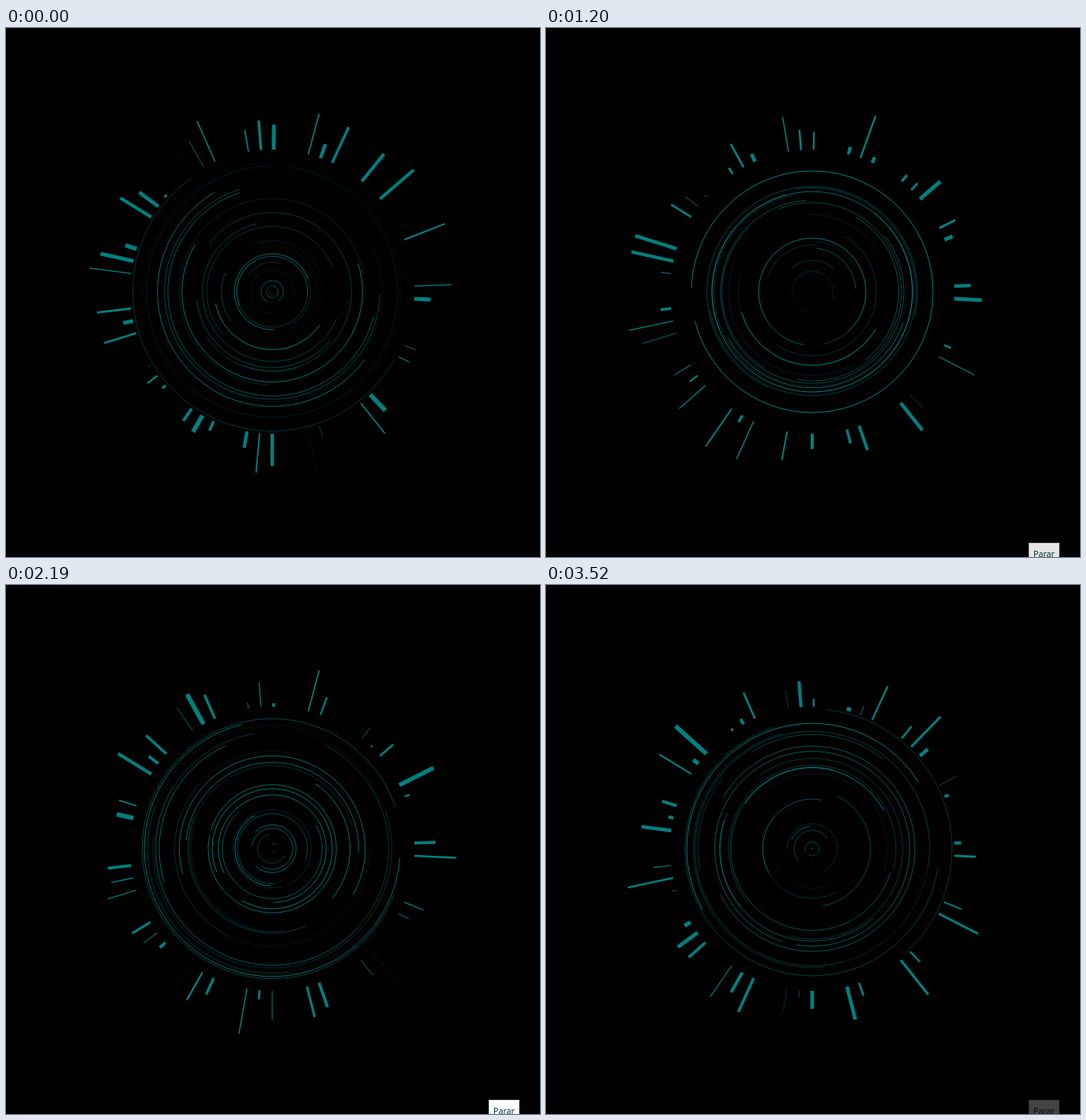
These frames come from a looping animation (676 by 670 pixels, 3590 ms). An HTML page with a canvas:

```html
<!DOCTYPE html>
<html lang="pt">
<head>
<meta charset="utf-8">
<title>Radial pulse</title>
<style>
  html, body { margin: 0; width: 676px; height: 670px; overflow: hidden; background: #000; }
  body { position: relative; }
  canvas { display: block; }
  #stop {
    position: absolute; left: 611px; top: 652px; width: 39px; height: 26px;
    box-sizing: border-box; border: 1px solid #ccc; background: #fff; color: #003c3c;
    font: 10.67px/27.7px "Noto Sans", "Open Sans", sans-serif; text-align: center; opacity: 0;
  }
</style>
</head>
<body>
<canvas id="stage" width="676" height="670"></canvas>
<div id="stop">Parar</div>
<script>
const LOOP = 3590, TICKS = 54, POSES = 33, LEAD = 6;
const CX = 337, CY = 334, INNER = 180;
const BARS = 40, BAR_STEP = 24.34, ARCS = 30;

const rad = deg => deg * Math.PI / 180;
const clamp = x => Math.max(0, Math.min(1, x));
const ctx = document.getElementById('stage').getContext('2d');
const stop = document.getElementById('stop');

function randomFrom(seed) {
  return () => {
    seed = (seed + 0x6D2B79F5) | 0;
    let x = Math.imul(seed ^ (seed >>> 15), 1 | seed);
    x = (x + Math.imul(x ^ (x >>> 7), 61 | x)) ^ x;
    return ((x ^ (x >>> 14)) >>> 0) / 4294967296;
  };
}

function drawBar(angle, length, width) {
  const c = Math.cos(angle), s = Math.sin(angle);
  ctx.lineWidth = width;
  ctx.beginPath();
  ctx.moveTo(INNER * c, INNER * s);
  ctx.lineTo((INNER + length) * c, (INNER + length) * s);
  ctx.stroke();
}

function drawArc(radius, from, sweep, width) {
  ctx.lineWidth = width;
  ctx.beginPath();
  ctx.arc(0, 0, radius, rad(from), rad(from + sweep));
  ctx.stroke();
}

function drawPose(pose) {
  const rnd = randomFrom(pose * 977 + 5);
  const between = (a, b) => a + (b - a) * rnd();

  ctx.setTransform(1, 0, 0, 1, 0, 0);
  ctx.fillStyle = '#000';
  ctx.fillRect(0, 0, 676, 670);
  ctx.translate(CX, CY);
  ctx.strokeStyle = '#008080';

  for (let i = 0; i < BARS; i++) {
    drawBar(rad(90 + i * BAR_STEP), between(0, 59), between(0.05, 5.6));
  }
  for (let i = 0; i < ARCS; i++) {
    drawArc(between(0, 178), between(0, 360), between(40, 360), between(0.03, 1));
  }
}

// The button fades in over ticks 17 to 19 and out over the last two.
const stopOpacity = tick => clamp((tick - 16) * 0.45) * clamp((TICKS - 0.3 - tick) * 0.37);

let shown = -1;
function frame() {
  // Poses change evenly, but only on whole ticks.
  const tick = Math.floor((performance.now() + LEAD) % LOOP / LOOP * TICKS);
  if (tick !== shown) {
    shown = tick;
    drawPose(Math.ceil((tick + 1) * POSES / TICKS) - 1);
    stop.style.opacity = stopOpacity(tick);
  }
  requestAnimationFrame(frame);
}
frame();
</script>
</body>
</html>
```
